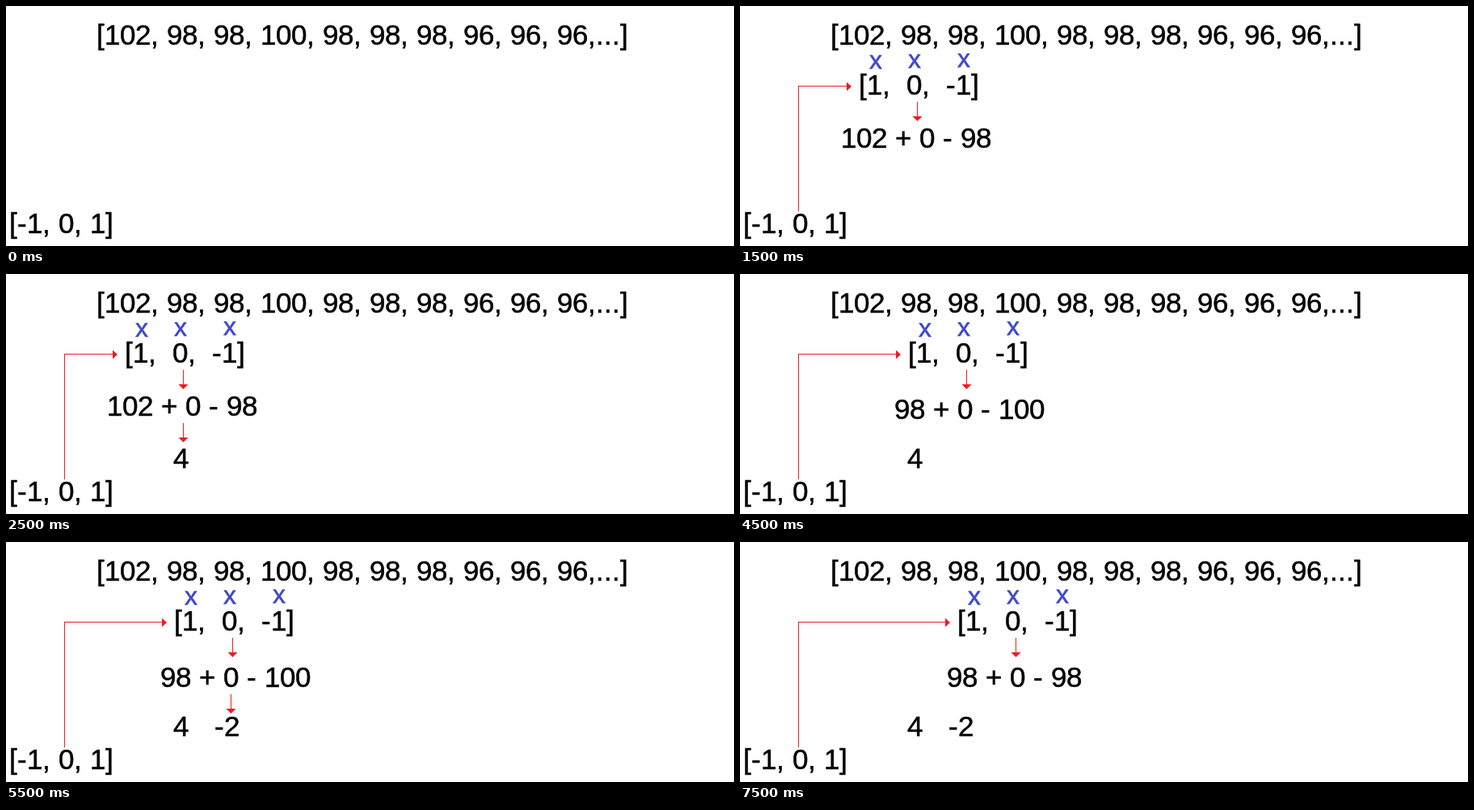
An HTML page with a canvas that plays this animation: 901x298 px, repeating every 8000 ms.

```html
<!DOCTYPE html>
<html lang="en">
<head>
<meta charset="utf-8">
<title>Convolution step by step</title>
<style>
  html, body { margin: 0; width: 100%; height: 100%; overflow: hidden; background: #fff; }
  canvas { display: block; }
</style>
</head>
<body>
<canvas id="stage" width="901" height="298"></canvas>
<script>
const ctx = document.getElementById('stage').getContext('2d');
const LOOP = 8000, STEP = 3000, SHIFT = 61;
const RED = '#ed1c24', BLUE = '#3f48cc';

const steps = [
  { sum: '102 + 0 - 98', sumX: 125, sumY: 176, result: '4', resultX: 207, arrowX: 219, arrowY: 185 },
  { sum: '98 + 0 - 100', sumX: 191, sumY: 180, result: '-2', resultX: 258, arrowX: 278, arrowY: 189 },
  { sum: '98 + 0 - 98', sumX: 256, sumY: 180 },
];

// Each glyph advances by a whole number of pixels, as hinted screen text does.
function text(str, x, y, size = 35, color = '#000') {
  ctx.font = `${size}px "Liberation Sans", Arial, sans-serif`;
  ctx.fillStyle = ctx.strokeStyle = color;
  ctx.lineWidth = 0.5;
  for (const char of str) {
    ctx.fillText(char, x, y);
    ctx.strokeText(char, x, y);
    x += Math.round(ctx.measureText(char).width);
  }
}

function triangle(...points) {
  ctx.beginPath();
  points.forEach(([x, y]) => ctx.lineTo(x, y));
  ctx.fill();
}

function downArrow(x, y) {
  ctx.fillStyle = RED;
  ctx.fillRect(x, y, 1, 19);
  triangle([x - 5.5, y + 18], [x + 6.5, y + 18], [x + 0.5, y + 24]);
}

function kernel(dx) {
  ctx.fillStyle = RED;
  ctx.fillRect(72, 99, 1, 156);
  ctx.fillRect(72, 99, 61 + dx, 1);
  triangle([132 + dx, 94.5], [138 + dx, 100], [132 + dx, 105.5]);
  text('[1,  0,  -1]', 147 + dx, 110);
  [[168, 78], [216, 77], [277, 76]].forEach(([x, y]) => text('x', x + dx - 8, y, 32, BLUE));
}

function draw(t) {
  ctx.fillStyle = '#fff';
  ctx.fillRect(0, 0, 901, 298);
  text('[102, 98, 98, 100, 98, 98, 98, 96, 96, 96,...]', 112, 48);
  text('[-1, 0, 1]', 4, 282);

  steps.forEach((s, i) => {
    const age = t - 500 - i * STEP;
    const solved = s.result && age >= 2000;
    if (solved) text(s.result, s.resultX, 241);
    if (age < 0 || age >= STEP) return;
    kernel(i * SHIFT);
    if (age >= 1000) {
      downArrow(219 + i * SHIFT, 119);
      text(s.sum, s.sumX, s.sumY);
    }
    if (solved) downArrow(s.arrowX, s.arrowY);
  });
}

const start = performance.now();
function tick() {
  draw((performance.now() - start) % LOOP);
  requestAnimationFrame(tick);
}
tick();
</script>
</body>
</html>
```
